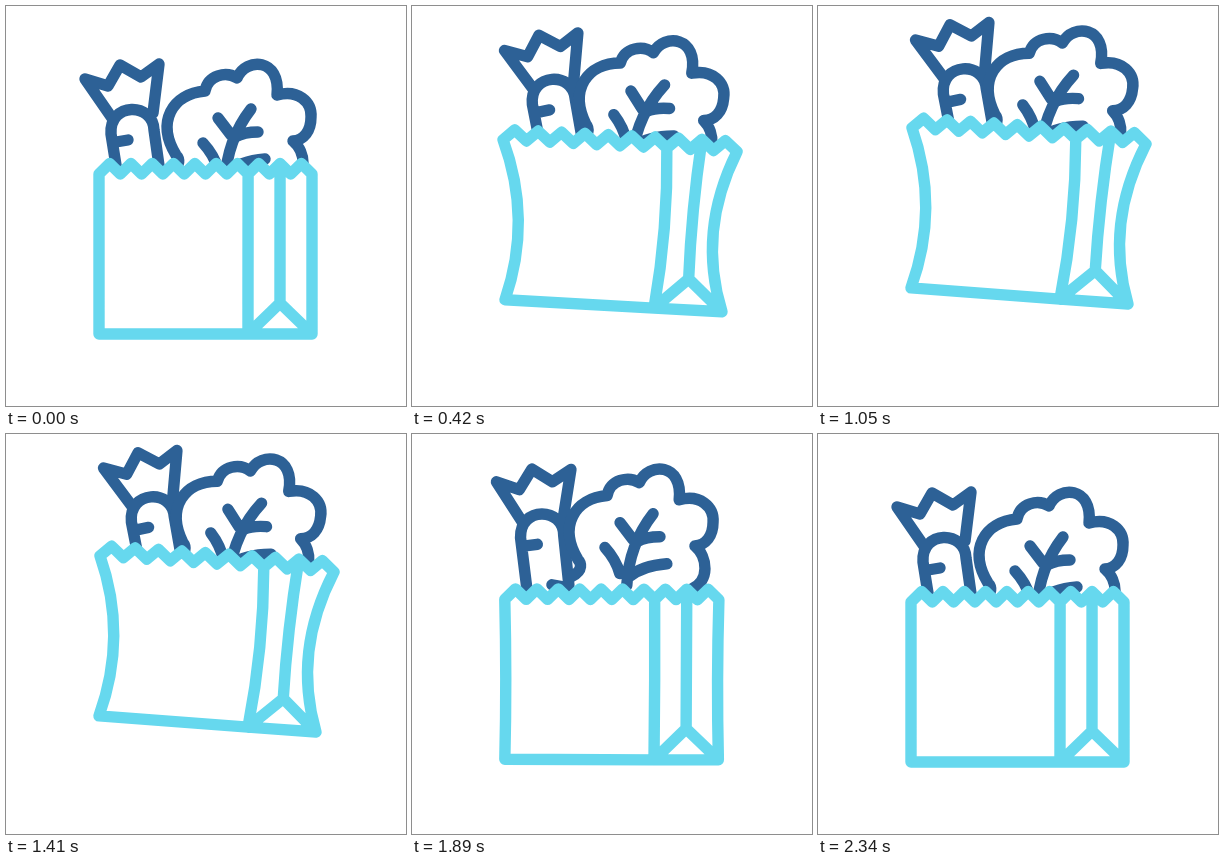
These frames come from a looping animation (400 by 400 pixels, 2.37 s). An HTML page with a canvas:

```html
<!DOCTYPE html>
<html lang="en">
<head>
<meta charset="utf-8">
<title>Grocery bag</title>
<style>
  html, body { margin: 0; height: 100%; overflow: hidden; background: #fff; }
  canvas { display: block; width: 400px; height: 400px; }
</style>
</head>
<body>
<canvas id="stage" width="400" height="400"></canvas>
<script>
const ctx = document.getElementById('stage').getContext('2d');
const LOOP = 2370;
const TEETH = 10;

const carrot = new Path2D(
  'M106 112 L79 73 L102 80 L114 59 L135 71 L153 58 L147 107' +
  'M113 178 L105 128 C103 96 147 96 148 124 L155 174' +
  'M110 136 L122 134 M138 174 L152 176');
const cabbage = new Path2D(
  'M164 166 C176 160 173 152 170 149 C150 116 166 88 199 85 C202 69 220 65 231 72' +
  'C240 51 275 52 271 89 C292 83 306 96 305 111 C305 125 298 134 287 135 C300 146 302 170 284 178' +
  'M245 103 Q221 134 219 175 M212 112 L225 129 M252 126 Q238 126 229 131' +
  'M197 137 Q208 149 212 163 M259 153 Q234 155 220 167');

// 0 before `from`, 1 after `to`, smooth between
function ease(t, from, to) {
  const u = Math.min(1, Math.max(0, (t - from) / (to - from)));
  return u * u * (3 - 2 * u);
}

// The bag is picked up, swung higher, then dropped while its contents hop
function poseAt(t) {
  const up = ease(t, 0, 630), swing = ease(t, 1410, 1650);
  const held = 1 - ease(t, 1650, 1930);
  return {
    lift: (38 * up + 9 * swing) * held,
    sway: (11.5 * up - 5 * swing) * held,
    tilt: (8 * up - 4 * swing) * held,
    flare: ease(t, 0, 210) * held,
    dip: 6 * swing * held,
    hop: 21 * ease(t, 1650, 1890) - 35 * ease(t, 1890, 2040) + 14 * ease(t, 2040, 2190)
  };
}

function drawVegetable(path, cx, cy, dx, dy, degrees) {
  ctx.save();
  ctx.translate(cx + dx, cy + dy);
  ctx.rotate(degrees * Math.PI / 180);
  ctx.translate(-cx, -cy);
  ctx.stroke(path);
  ctx.restore();
}

// Curve from a to b passing through mid
function bend(a, mid, b) {
  ctx.quadraticCurveTo(2 * mid[0] - (a[0] + b[0]) / 2, 2 * mid[1] - (a[1] + b[1]) / 2, ...b);
}

function drawBag({ lift, sway, tilt, flare, dip }) {
  // Sway grows towards the rim, tilt towards the sides
  const place = (x, y, dx = 0, dy = 0) => [
    x + dx + sway * (328 - y) / 160,
    y + dy - lift + tilt * (x - 200) / 106
  ];
  const pinch = 9 * flare + 0.4 * dip;
  const topLeft = place(93, 168, -10.5 * flare);
  const topRight = place(306, 168, 10.5 * flare);
  const bottomLeft = place(93, 328, -dip / 2);
  const bottomRight = place(306, 328, 4 * flare + dip / 2);
  const foldFoot = place(242, 328, 0, dip);
  const creaseFoot = place(274, 297, flare);
  const rim = k => [0, 1].map(axis =>
    topLeft[axis] + (topRight[axis] - topLeft[axis]) * k / (2 * TEETH) - axis * (k % 2) * 10.5);

  ctx.beginPath();
  ctx.moveTo(...topLeft);
  for (let k = 1; k <= 2 * TEETH; k++) ctx.lineTo(...rim(k));
  bend(topRight, place(306, 248, -pinch), bottomRight);
  ctx.lineTo(...foldFoot);
  ctx.lineTo(...bottomLeft);
  bend(bottomLeft, place(93, 248, pinch), topLeft);
  ctx.closePath();
  ctx.fill();

  ctx.moveTo(...rim(14));
  bend(rim(14), place(242, 248, 6 * flare + 0.6 * dip), foldFoot);
  ctx.lineTo(...creaseFoot);
  ctx.lineTo(...bottomRight);
  ctx.moveTo(...rim(17));
  bend(rim(17), place(274, 228, 2 * flare), creaseFoot);
  ctx.stroke();
}

function draw(t) {
  const pose = poseAt(t);
  const { lift, sway, tilt, flare, hop } = pose;
  ctx.fillStyle = '#fff';
  ctx.fillRect(0, 0, 400, 400);
  ctx.lineWidth = 11.4;
  ctx.lineCap = ctx.lineJoin = 'round';
  ctx.strokeStyle = '#2d6196';
  drawVegetable(carrot, 126, 104, 1.7 * sway + 0.18 * hop, -lift - tilt / 3 - hop, 0.1 * hop - 2 * flare);
  drawVegetable(cabbage, 232, 110, sway - 1.5 * flare - 0.2 * hop, 3 * flare - lift - hop, 5 * flare);
  ctx.strokeStyle = '#66d8ee';
  drawBag(pose);
}

const start = performance.now();
function frame() {
  draw((performance.now() - start) % LOOP);
  requestAnimationFrame(frame);
}
frame();
</script>
</body>
</html>
```
